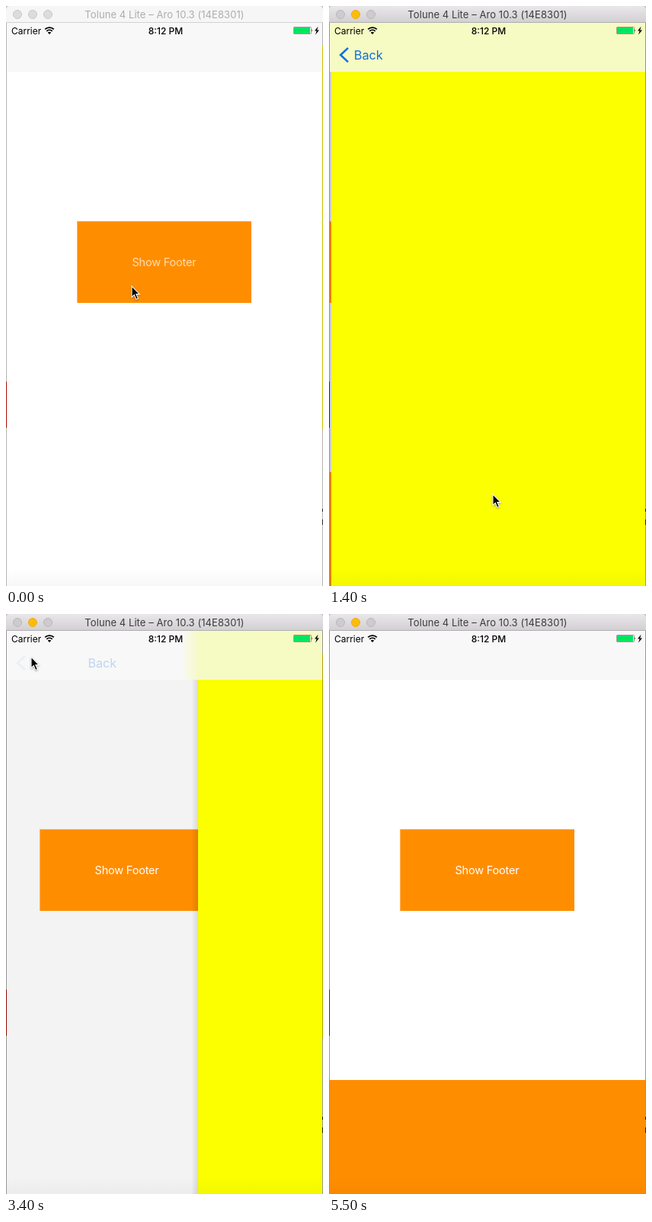
An HTML page for the animation above (6 s loop, 416 by 758 pixels).

```html
<!DOCTYPE html>
<html lang="en">
<head>
<meta charset="utf-8">
<title>Footer demo</title>
<style>
html, body { margin: 0; width: 100%; height: 100%; overflow: hidden; background: #c8c8c8; }
body { font-family: Inter, Roboto, sans-serif; }
#stage { position: relative; width: 416px; height: 758px; overflow: hidden; }
#stage div, #stage svg, #stage span { position: absolute; }
span { white-space: nowrap; }

#screen { left: 0; top: 22px; width: 416px; height: 736px; overflow: hidden; background: #fff; }
#home, #dim { left: 0; top: 0; width: 546px; height: 736px; }
#button { left: 93px; top: 259px; width: 229px; height: 107px; background: #ff8d00; box-shadow: inset 1px 1px #ffb65c; }
#label { left: 0; width: 229px; line-height: 107px; text-align: center; color: #fff; font-size: 14.5px; letter-spacing: -.2px; }
#footer { left: 0; top: 587px; width: 546px; height: 149px; background: #ff8d00; }
#dim { background: #000; }
#page { left: 0; top: 0; width: 416px; height: 736px; background: #fbff00; }
#shade { left: -9px; top: 0; width: 9px; height: 736px; background: linear-gradient(to right, transparent, rgba(0,0,0,.11)); }
#bar { left: 0; top: 0; width: 416px; height: 64px; overflow: hidden; background: #f8f8f8; }
#tint { left: -22px; top: 0; width: 450px; height: 64px; background: linear-gradient(to right, rgba(246,250,195,0), #f6fac3 24px); }
#back { left: 32px; top: 32px; line-height: 20px; font-size: 16.3px; letter-spacing: -.1px; color: #0b6fe0; }
#chevron { left: 13px; top: 32px; }
#glow { left: 0; bottom: 0; width: 416px; height: 22px; background: linear-gradient(transparent, rgba(0,0,0,.03)); }

.status { top: 25px; line-height: 16px; font-size: 12px; color: #000; }
#clock { left: 0; width: 419px; text-align: center; font-weight: 500; }

#titlebar { left: 0; top: 0; width: 416px; height: 21px; border-bottom: 1px solid #d2d2d2; border-radius: 5px 5px 0 0; background: #f6f6f6; color: #adadad; }
.active #titlebar { border-color: #b1afb1; background: linear-gradient(#e9e7e9, #d2d0d2); color: #3c3c3c; }
#title { left: 0; width: 416px; line-height: 22px; text-align: center; font-size: 13px; letter-spacing: .07px; }
.light { top: 5px; width: 10px; height: 10px; border: 1px solid #c9c9c9; border-radius: 50%; background: #dcdcdc; }
.active .light { border-color: #bab8ba; background: #cdcbcd; }
.active .light.mid { border-color: #eeae18; background: #fdbc0b; }

.edge { width: 1px; }
.active .edge { filter: brightness(.84); }
</style>
</head>
<body>
<div id="stage">
  <div id="screen">
    <div id="home">
      <div id="dim"></div>
      <div id="button"><span id="label">Show Footer</span></div>
      <div id="footer"></div>
    </div>
    <div id="page"><div id="shade"></div></div>
    <div id="bar">
      <div id="tint"></div>
      <svg id="chevron" width="14" height="20" fill="none" stroke="#0b6fe0" stroke-width="2.6"><path d="M12 .9 2.2 10 12 19.1"/></svg>
      <span id="back">Back</span>
    </div>
    <div id="glow"></div>
  </div>

  <span class="status" style="left:7px">Carrier</span>
  <span class="status" id="clock">8:12 PM</span>
  <svg style="left:50px;top:26px" width="14" height="12" fill="none" stroke="#000" stroke-width="1.8">
    <path d="M1.2 4.4a8.4 8.4 0 0 1 11.6 0M3.3 6.8a5.3 5.3 0 0 1 7.4 0"/>
    <path d="M7 10.9 4.8 8.7a3.2 3.2 0 0 1 4.4 0Z" fill="#000" stroke="none"/>
  </svg>
  <svg style="left:376px;top:26px" width="38" height="13">
    <rect x="1.5" y="1.5" width="23" height="9" rx="1" fill="none" stroke="#000" stroke-opacity=".5" stroke-width=".7"/>
    <rect x="2" y="2" width="21" height="8" fill="#00e461"/>
    <path d="M25.4 4.2q1.4 1.8 0 3.6Z"/>
    <path d="M33.5 .8 29 6.6h2.6L30 11.6l5-6.2h-2.8Z"/>
  </svg>

  <div id="titlebar">
    <div class="light" style="left:9px"></div>
    <div class="light mid" style="left:29px"></div>
    <div class="light" style="left:49px"></div>
    <span id="title">Tolune 4 Lite – Aro 10.3 (14E8301)</span>
  </div>

  <div class="edge" style="left:0;top:22px;height:736px;background:#b4b4b4"></div>
  <div class="edge" style="left:0;top:491px;height:60px;background:#a80c00"></div>
  <div class="edge" style="left:415px;top:22px;height:736px;background:#b4b4b4"></div>
  <div class="edge" style="left:415px;top:52px;height:502px;background:#cfc000"></div>
  <div class="edge" style="left:415px;top:657px;height:4px;background:#222"></div>
  <div class="edge" style="left:415px;top:671px;height:7px;background:#222"></div>

  <svg id="cursor" style="left:-2px;top:-2px" width="16" height="24">
    <path transform="translate(2 2)" d="M0 0V14.6L3.3 11.5 5.8 17.4 8.4 16.3 5.9 10.6H10.3Z" stroke="#fff" stroke-width="1.1" style="filter:drop-shadow(0 1px 1px rgba(0,0,0,.35))"/>
  </svg>
</div>
<script>
const LOOP = 6000, STEP = 100, WIDTH = 415;
const $ = id => document.getElementById(id);
const clamp = v => Math.min(1, Math.max(0, v));
const smooth = v => v * v * (3 - 2 * v);
const shift = (id, x, y = 0) => { $(id).style.transform = `translate(${x}px,${y}px)`; };
const fade = (id, v) => { $(id).style.opacity = v; };

// Pointer stops: time, x, y
const path = [
  [0, 165, 366], [300, 165, 366], [700, 215, 638], [1800, 215, 638],
  [2200, 214, 361], [2400, 214, 361], [2700, 21, 37], [2800, 27, 44],
  [3100, 33, 56], [3400, 33, 56], [3800, 38, 60], [4200, 133, 364],
  [4900, 133, 364], [5100, 231, 410], [5200, 231, 410], [5500, 30, -30], [LOOP, 30, -30]
];

function pointer(t) {
  const i = path.findIndex(p => p[0] > t);
  const [t0, x0, y0] = path[i - 1], [t1, x1, y1] = path[i];
  const k = (t - t0) / (t1 - t0);
  return [x0 + (x1 - x0) * k, y0 + (y1 - y0) * k];
}

// Critically damped spring: share of the way still left
function left(ms) {
  const s = Math.max(0, ms) * .018;
  return (1 + s) * Math.exp(-s);
}

function draw(t) {
  const secondHalf = t >= 2500;
  const away = secondHalf ? 1 - left(t - 3286) : left(t - 1006);
  const x = Math.round(WIDTH * away), shown = 1 - away;
  shift('page', x);
  shift('tint', x);
  shift('home', -.3 * (WIDTH - x));
  fade('dim', .12 * shown);
  fade('shade', x > 0 && x < WIDTH ? 1 : 0);
  fade('tint', x < WIDTH ? 1 : 0);

  shift('back', 124 * away);
  fade('back', shown ** 1.5 * (t === 3200 ? .4 : 1));
  fade('chevron', shown ** 3);

  // The footer rises after each tap on the button
  const up = smooth(clamp((t - (secondHalf ? 4291 : 91)) / 300));
  shift('footer', 0, Math.round(149 * (1 - up)));
  fade('label', t === 0 || t === 4200 ? .7 : 1);

  $('stage').className = t >= 900 ? 'active' : '';
  shift('cursor', ...pointer(t));
}

const start = performance.now();
function tick(now) {
  const t = Math.max(0, now - start) % LOOP;
  draw(Math.floor(t / STEP) * STEP);
  requestAnimationFrame(tick);
}
draw(0);
requestAnimationFrame(tick);
</script>
</body>
</html>
```
